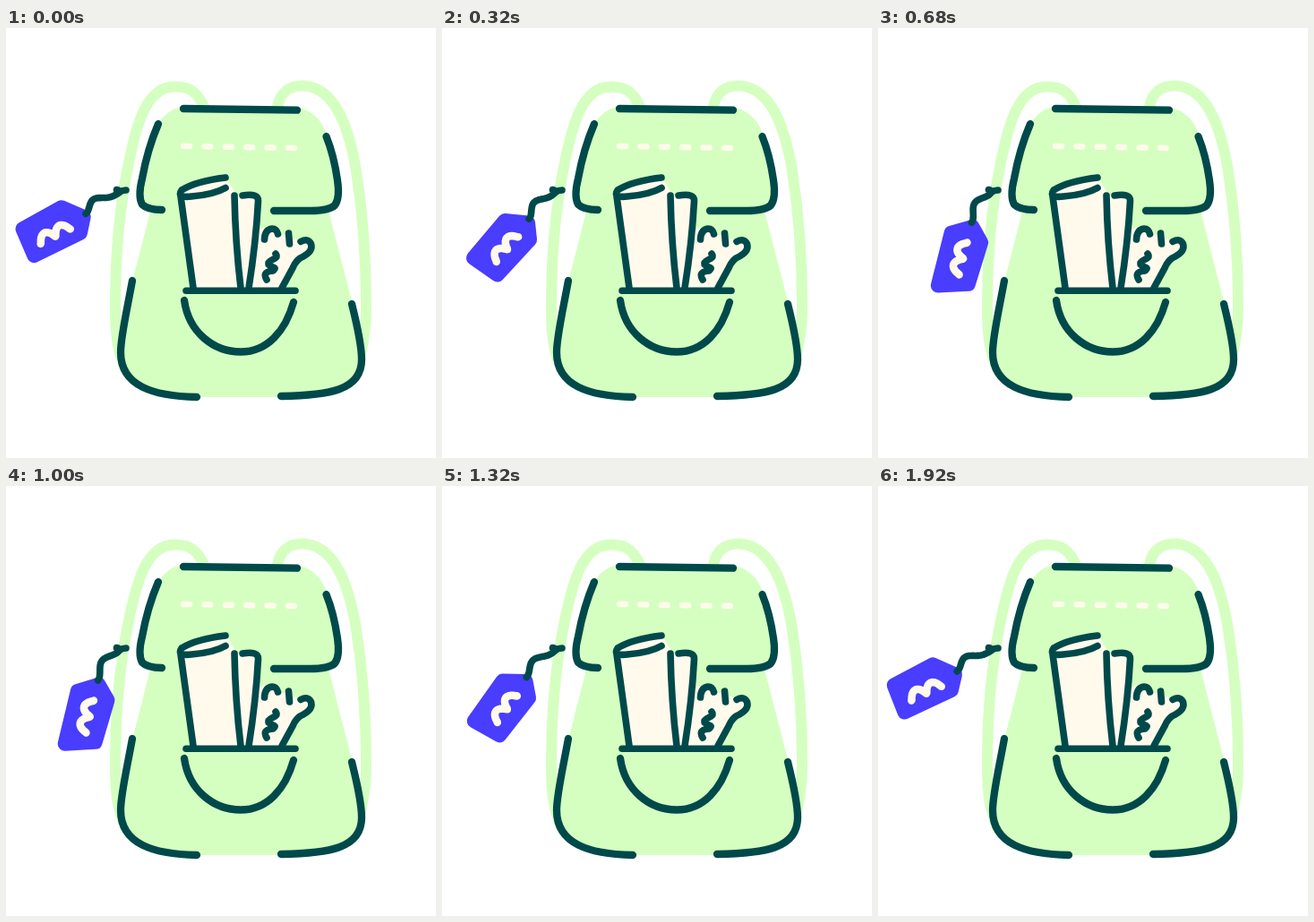
An HTML page for the animation above (1.96 s loop, 480x480 px).

```html
<!DOCTYPE html>
<html lang="en">
<head>
<meta charset="utf-8">
<title>Backpack with swinging tag</title>
<style>
  html, body { margin: 0; width: 100%; height: 100%; overflow: hidden; background: #fff; }
  svg { display: block; width: 100%; height: 100%; }
  path { stroke-linecap: round; stroke-linejoin: round; }
  .line { fill: none; stroke: #00494b; stroke-width: 8.3; }
  .thin { stroke-width: 7.6; }
  .strap { fill: none; stroke: #d5ffc0; stroke-width: 12; }
  .body { fill: #d5ffc0; }
  .paper { fill: #fffaec; }
  .mark { fill: none; stroke: #fffaec; }
  #tag { fill: #493dff; stroke: #493dff; stroke-width: 16; }
</style>
</head>
<body>
<svg viewBox="0 0 480 480">
  <path class="strap" d="M221 88C214 72 205 65 188 65.500C157 66 146 105 136 155C125 210 122 260 122 310C122 345 125 362 133 380"/>
  <path class="strap" d="M303 88C306 71 318 64 332 64.500C365 66 382 105 391 160C398 205 402 260 402 310C402 340 398 360 391 378"/>
  <path class="body" d="M195 88L327 89Q349 94 358 118L371 180Q372 200 360 204L386 305C394 335 397 355 397 370C397 405 360 410 307 412H214C165 411 128 400 128 362Q129 340 141 283L161 205Q148 202 150 182Q155 140 172 104Q180 92 195 88Z"/>
  <path class="mark" stroke-width="6.500" stroke-dasharray="7 16.400" d="M198 132L323 134"/>

  <g class="paper">
    <path d="M194 187Q204 174 246 167L256 184L263 291H209Z"/>
    <path d="M257 187L282 187L273 291H261Z"/>
    <path d="M283 225Q298 217 304 228Q308 233 313 230L328 238Q345 238 334 254Q325 258 321 268L308 291H271Z"/>
  </g>

  <g class="line">
    <path d="M198 90L325 91.700"/>
    <path d="M170 107Q158 135 152 168Q147 188 152 197Q158 203 174 203"/>
    <path d="M357.500 121Q366 142 370 170Q373 190 367 198Q360 204 340 204H299"/>
    <path d="M141 282C134 320 128 345 128 362C128 400 165 411 213 412"/>
    <path d="M386 308C392 332 397 355 397 370C397 405 360 410 307 411"/>
    <path d="M199 304C204 340 232 361.500 262 361.500C292 361.500 312 338 321 306"/>
  </g>
  <g class="line thin">
    <path d="M201 293.200H323"/>
    <path d="M195 188L209 290M245 167Q212 171 196 181Q190 190 207 188Q232 186 245 178.500"/>
    <path d="M255 187Q256 240 262 290M264 187Q282 184 281.500 193Q279 240 271 290"/>
    <path d="M308 290L320 268Q324 258 332 255Q343 249 340.500 241Q337 234 329 238.500M288.500 236Q289 225 297 224Q302 224 303.500 230M315.500 229L316.500 241"/>
    <path d="M301 252C306 259 291 258 293 264C296 268 304 266 298 271C288 272 288 276 291 281"/>
  </g>

  <g id="swing">
    <path id="tag"/>
    <path id="squiggle" class="mark" stroke-width="8.500"/>
  </g>
  <g class="line thin">
    <path id="string"/>
    <path d="M123.500 180.500Q126 181 127 183Q130 181 134 181"/>
  </g>
</svg>
<script>
const PERIOD = 1960, STEP = 40, LEAD = 150;
const KNOT = { x: 126, y: 184 };
const CORNERS = [[-19, 19], [2, 4], [16, 17], [14.5, 70], [-18, 74]];
const { PI, sin, cos } = Math;
const set = (id, name, value) => document.getElementById(id).setAttribute(name, value);

// Path through points sampled for u from 0 to 1.
function trace(point, count = 32) {
  const points = Array.from({ length: count + 1 }, (_, i) => point(i / count));
  return "M" + points.join("L");
}

function draw(now) {
  const t = Math.floor(now % PERIOD / STEP) * STEP;
  const phase = 2 * PI * (t + LEAD) / PERIOD;
  const lift = cos(phase), lag = sin(phase);

  // End of the string, where the tag hangs.
  const x = 96 - 8.8 * lift + 1.7 * lag;
  const y = 213.5 - 5.5 * lift - 1.6 * lift * lift;
  const angle = 38 + 28 * lift + 1.5 * lag;
  set("swing", "transform", `translate(${x} ${y}) rotate(${angle})`);

  // The tag fans open and bends a little as it swings.
  const warp = ([px, py]) => [px + 2 * lift * py / 75, py + lift * px * (py - 40) / 160];
  set("tag", "d", "M" + CORNERS.map(warp).join("L") + "Z");

  set("squiggle", "d", trace(u => [
    4 * lift - 0.5 + 4.5 * cos(4 * PI * u),
    23 + 37 * u - 2 * sin(4 * PI * u)
  ]));

  // The string bulges to one side of the line from knot to tag.
  const dx = x - KNOT.x, dy = y - KNOT.y, length = Math.hypot(dx, dy);
  set("string", "d", trace(u => {
    const bulge = 9 * sin(PI * u ** (1.25 + 0.3 * lift)) ** 2 / length;
    return [KNOT.x + dx * u - dy * bulge, KNOT.y + dy * u + dx * bulge];
  }));
}

const start = performance.now();
function loop() {
  draw(performance.now() - start);
  requestAnimationFrame(loop);
}
loop();
</script>
</body>
</html>
```
